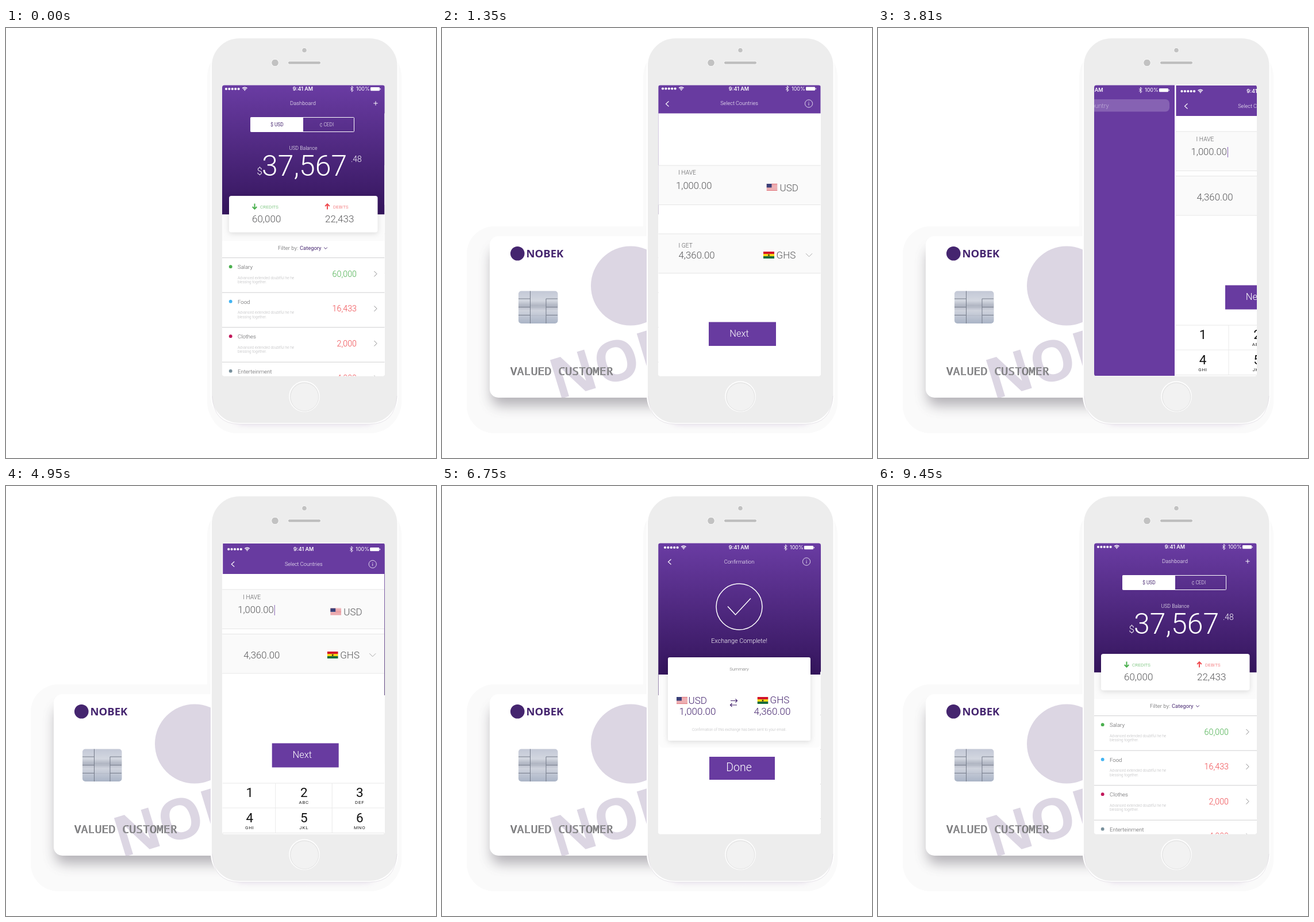
An HTML page for the animation above (9480 ms loop, 748 by 748 pixels).

```html
<!DOCTYPE html>
<html lang="en">
<head>
<meta charset="utf-8">
<title>Currency exchange app</title>
<style>
  html, body { margin: 0; width: 100%; height: 100%; overflow: hidden; background: #fff; }
  svg { display: block; }
  #stage { width: 100vw; height: 100vh; }
  text { font-family: Roboto, "Liberation Sans", sans-serif; font-weight: 300; white-space: pre; }
  .status text { font-family: Inter, sans-serif; font-weight: 400; }
  .panel { filter: drop-shadow(0 2px 5px rgba(0, 0, 0, .13)); }
</style>
</head>
<body>
<svg id="stage" viewBox="0 0 748 748">
  <defs>
    <linearGradient id="dusk" x2="0" y2="1">
      <stop stop-color="#6a3ca3"/><stop offset="1" stop-color="#34155c"/>
    </linearGradient>
    <linearGradient id="metal" x2="0" y2="1">
      <stop stop-color="#c3c8d6"/><stop offset=".3" stop-color="#d3d7e0"/>
      <stop offset=".45" stop-color="#b0b5c2"/><stop offset=".6" stop-color="#cfd3dd"/>
      <stop offset="1" stop-color="#aab4c6"/>
    </linearGradient>
    <filter id="blur" x="-30%" y="-30%" width="160%" height="160%"><feGaussianBlur stdDeviation="11"/></filter>
    <filter id="softBlur" x="-20%" y="-50%" width="140%" height="200%"><feGaussianBlur stdDeviation="5"/></filter>
    <clipPath id="display"><rect x="376" y="99.5" width="283" height="506" rx="4"/></clipPath>
    <clipPath id="cardShape"><rect x="83" y="362" width="445" height="281" rx="15"/></clipPath>
    <clipPath id="behindPhone"><rect width="640" height="748"/></clipPath>
  </defs>
  <g id="back"></g>
  <g clip-path="url(#behindPhone)"><g id="card"></g></g>
  <g id="phone"></g>
  <g clip-path="url(#display)"><g id="strip"></g></g>
</svg>
<script>
const PURPLE = '#683ba0', DEEP = '#45256f', GREY = '#58585a', PALE = '#b9b9bb';
const GREEN = '#4bb04f', RED = '#ef4a4f';
const LOOP = 9480, STEP = 30, STRIDE = 282;

// Drawing helpers
const rect = (x, y, w, h, fill, more = '') =>
  `<rect x="${x}" y="${y}" width="${w}" height="${h}" fill="${fill}" ${more}/>`;
const circle = (x, y, r, fill, more = '') =>
  `<circle cx="${x}" cy="${y}" r="${r}" fill="${fill}" ${more}/>`;
const line = (d, color, width = 1) =>
  `<path d="${d}" fill="none" stroke="${color}" stroke-width="${width}"/>`;
const shape = (d, fill) => `<path d="${d}" fill="${fill}"/>`;
const text = (x, y, size, fill, str, more = '') =>
  `<text x="${x}" y="${y}" font-size="${size}" fill="${fill}" ${more}>${str}</text>`;
const mid = (x, y, size, fill, str, more = '') =>
  text(x, y, size, fill, str, 'text-anchor="middle" ' + more);
const right = (x, y, size, fill, str) => text(x, y, size, fill, str, 'text-anchor="end"');
const shift = (x, y, content) => `<g transform="translate(${x} ${y})">${content}</g>`;
const each = (n, fn) => Array.from({ length: n }, (_, i) => fn(i)).join('');

// Flags on an 18 x 12 field
const rows = (...c) => c.map((f, i) => rect(0, i * 12 / c.length, 18, 12 / c.length + .05, f)).join('');
const columns = (...c) => c.map((f, i) => rect(i * 18 / c.length, 0, 18 / c.length + .05, 12, f)).join('');
const jack = rows('#1f3580') + line('M0 0L18 12M18 0L0 12', '#fff', 2.6) + line('M0 0L18 12M18 0L0 12', '#d4213d', 1)
  + line('M9 0V12M0 6H18', '#fff', 4) + line('M9 0V12M0 6H18', '#d4213d', 2.2);
const canton = `<g transform="scale(.5)">${jack}</g>`;
const star = (x, y, r, fill) => shape('M' + Array.from({ length: 10 }, (_, i) => {
  const a = i * Math.PI / 5, d = i % 2 ? r * .4 : r;
  return `${x + d * Math.sin(a)} ${y - d * Math.cos(a)}`;
}).join('L') + 'Z', fill);
const stars = (fill, ...points) => points.map(([x, y]) => star(x, y, 1, fill)).join('');

const flags = {
  AOA: rows('#d0142c', '#111') + circle(9, 6, 2, 'none', 'stroke="#f6c92c"') + circle(9.5, 6, .8, '#f6c92c'),
  AUD: rows('#17296f') + canton + star(4.5, 9.3, 1.5, '#fff') + stars('#fff', [13.5, 2], [11.5, 5.5], [15.5, 5], [13.5, 10]),
  BSD: rows('#1aa3b8', '#f8d63f', '#1aa3b8') + shape('M0 0L8 6L0 12Z', '#111'),
  BMD: rows('#d0142c') + canton + rect(11.5, 4, 4, 5, '#fff') + circle(13.5, 6.5, 1.2, '#d0142c'),
  BWP: rows('#75b2dd', '#75b2dd', '#fff', '#111', '#fff', '#75b2dd', '#75b2dd'),
  BRL: rows('#17963f') + shape('M9 1L17 6L9 11L1 6Z', '#f9d616') + circle(9, 6, 2.6, '#26357c'),
  GBP: jack,
  BIF: rows('#d0142c') + shape('M0 0L9 6L0 12ZM18 0L9 6L18 12Z', '#1f9a3a')
    + line('M0 0L18 12M18 0L0 12', '#fff', 2) + circle(9, 6, 3.2, '#fff') + stars('#d0142c', [9, 4.7], [7.7, 7], [10.3, 7]),
  CAD: columns('#e0202a', '#fff', '#fff', '#e0202a') + star(9, 6, 2.8, '#e0202a'),
  CNY: rows('#df2a1c') + star(4, 4, 2.3, '#f9dc2e') + stars('#f9dc2e', [8, 1.8], [9.3, 3.6], [9.3, 5.7], [8, 7.5]),
  COP: rows('#f8d21c', '#f8d21c', '#21409a', '#d0142c'),
  CDF: rows('#2a83d5') + line('M0 12L18 0', '#f7d618', 5) + line('M0 12L18 0', '#d8283b', 3) + star(3.5, 3, 2, '#f7d618'),
  EGP: rows('#d0142c', '#fff', '#111') + circle(9, 6, 1.4, '#c79a2b'),
  ETB: rows('#1f9a3a', '#f8d21c', '#d8232e') + circle(9, 6, 3.2, '#1b55b5') + star(9, 6, 2, '#f8d21c'),
  EUR: rows('#1d439c') + each(12, i => circle(9 + 3.8 * Math.sin(i * Math.PI / 6), 6 - 3.8 * Math.cos(i * Math.PI / 6), .55, '#f8d21c')),
  GMD: rect(0, 0, 18, 4, '#d0142c') + rect(0, 4, 18, 4, '#fff') + rect(0, 4.6, 18, 2.8, '#1c2f8a') + rect(0, 8, 18, 4, '#1f9a3a'),
  GHS: rows('#d3122a', '#f9d616', '#136b3c') + star(9, 6.1, 2.2, '#111'),
  GNF: columns('#d0142c', '#f8d21c', '#1f9a3a'),
  USD: rows(...Array.from({ length: 13 }, (_, i) => i % 2 ? '#fff' : '#d43a44')) + rect(0, 0, 8.5, 6.5, '#3a3f78'),
};
const flag = (code, x, y, w = 19, h = 12) =>
  `<svg x="${x}" y="${y}" width="${w}" height="${h}" viewBox="0 0 18 12" preserveAspectRatio="none">${flags[code]}</svg>`;

// Interface parts
const status = (left, time, rightX, y) => `<g class="status">
  ${each(5, i => circle(left + i * 5.4, y, 2.1, '#fff'))}
  ${shift(left + 32.3, y, line('M-4.2 -1.1Q0 -4.5 4.2 -1.1M-2.5 .8Q0 -1.2 2.5 .8', '#fff', 1.4) + circle(0, 2.2, 1, '#fff'))}
  ${mid(time, y + 3.4, 9, '#fff', '9:41 AM', 'style="font-weight:600"')}
  ${shift(rightX, y, line('M-10 -2.4L-4.8 2.4L-7.4 4.8V-4.8L-4.8 -2.4L-10 2.4', '#fff', .9))}
  ${text(rightX, y + 3.4, 9, '#fff', '100%')}
  ${rect(rightX + 25, y - 3, 16, 6.2, '#fff', 'rx="1.2"')}${rect(rightX + 41.6, y - 1, 1.2, 2.4, '#fff')}</g>`;
const backArrow = (x, y) => line(`M${x + 5} ${y - 4.5}L${x} ${y}L${x + 5} ${y + 4.5}`, '#fff', 1.1);
const info = (x, y) => circle(x, y, 6.6, 'none', 'stroke="#fff" stroke-width=".8"')
  + line(`M${x} ${y - 1}V${y + 3.2}M${x} ${y - 3.2}V${y - 2}`, '#fff', .8);
const down = (x, y, w, color) => line(`M${x - w} ${y - w / 2}L${x} ${y + w / 2}L${x + w} ${y - w / 2}`, color);
const button = (x, y, w, h, label, size) =>
  rect(x, y, w, h, PURPLE) + mid(x + w / 2 - 5.5, y + h / 2 + size * .27, size, '#fff', label);
const band = y => rect(376.5, y, 282.5, 68, '#fafafa') + line(`M376.5 ${y}H659M376.5 ${y + 68.5}H659`, '#e6e6e6');
const arrow = (x, y, dir, color) =>
  line(`M${x} ${y - 5 * dir}V${y + 4 * dir}M${x - 3.8} ${y + .5 * dir}L${x} ${y + 4.4 * dir}L${x + 3.8} ${y + .5 * dir}`, color, 2);

function dashboard(d) {
  const entries = [['Salary', GREEN], ['Food', '#42b4f2'], ['Clothes', '#c2185b'], ['Enterteinment', '#78909c']];
  const usd = d.currency === 'USD', split = usd ? 517 : 514.5, dy = usd ? 0 : -1.5, edge = d.panel[0];
  return rect(376, 99, 282.5, d.bottom - 99, 'url(#dusk)')
    + status(383, usd ? 516.5 : 515.5, usd ? 609 : 607, 106)
    + mid(usd ? 516.5 : 515.5, 134, 9.4, '#fff', 'Dashboard')
    + shift(usd ? 643 : 640.5, 131, line('M-3.7 0H3.7M0 -3.7V3.7', '#fff'))
    + rect(d.toggle, 155.5, 605.5 - d.toggle, 25, 'none', 'rx="1" stroke="#fff"')
    + rect(usd ? d.toggle : split, 155.5, usd ? split - d.toggle : 605.5 - split, 25, '#fff')
    + mid(471.5, 171, 8.3, usd ? DEEP : '#fff', '$ USD', usd ? 'style="font-weight:400"' : '')
    + mid(usd ? 558 : 555.5, 171, 8.3, usd ? '#fff' : DEEP, usd ? '¢ CEDI' : '¢ GHS', usd ? '' : 'style="font-weight:400"')
    + mid(517, 211.5, 8.7, '#fff', d.currency + ' Balance')
    + d.amount
    + rect(376, d.bottom, 283, 46, '#fbfbfb') + rect(376, 362 + dy, 283, 8, '#fbfbfb', 'rx="6"')
    + rect(edge, d.panel[1], d.panel[2], 63.5, '#fff', 'rx="4" class="panel"')
    + shift(0, dy / 2, arrow(432.5, 310.5, 1, GREEN) + text(442, 314, 8.1, GREEN, 'CREDITS')
      + arrow(usd ? 559 : 557.5, 310.5, -1, RED) + text(usd ? 569 : 567, 314, 8.1, RED, 'DEBITS')
      + text(428, 338, 17, GREY, d.credits) + text(usd ? 555 : 553.5, 338, 17, GREY, d.debits))
    + shift(usd ? 0 : -1, dy, text(473, 386, 9.6, GREY, 'Filter by:')
      + text(511, 386, 9.4, DEEP, 'Category', 'style="font-weight:400"') + down(556, 383, 2.8, DEEP))
    + entries.map(([name, color], i) => shift(0, dy + i * (usd ? 60.5 : 60.2),
        line('M376 399.7H659', '#cfcfd1') + circle(usd ? 390.7 : 391.7, 415.2, 2.9, color)
        + text(403, 419.3, 9.6, GREY, name)
        + text(403, 436.6, 6.5, PALE, 'Advanced extended doubtful he he') + text(403, 444, 6.5, PALE, 'blessing together.')
        + right(usd ? 610 : 608, 432.8, 14.3, i ? RED : GREEN, d.values[i])
        + shift(usd ? 0 : -2, 0, line('M640.5 423L645 427.7L640.5 432.4', '#8a8a8c')))).join('');
}
const dollars = dashboard({ currency: 'USD', bottom: 324.5, toggle: 425.5, panel: [388, 292, 258.5],
  amount: text(436.5, 255, 17, '#fff', '$') + text(445, 257, 50, '#fff', '37,567') + text(600, 232.5, 14, '#fff', '.48'),
  credits: '60,000', debits: '22,433', values: ['60,000', '16,433', '2,000', '4,000'] });
const cedis = dashboard({ currency: 'GHS', bottom: 323.5, toggle: 427, panel: [389, 291, 255.5],
  amount: text(414.5, 258, 16.5, '#fff', '¢') + text(425.5, 258, 49.5, '#fff', '163,794') + text(598, 231.5, 14, '#fff', '.21'),
  credits: '261,600', debits: '97,807', values: ['261,600', '71,647', '8,720', '17,440'] });

const countries = rect(376.5, 99, 282.5, 49.5, PURPLE) + status(384, 516.5, 608, 105.5)
  + backArrow(389.5, 132) + mid(517, 134, 9.2, '#fff', 'Select Countries') + info(638, 131.5)
  + band(239) + text(411, 255, 10.3, GREY, 'I HAVE') + text(407, 279.5, 16.6, GREY, '1,000.00')
  + flag('USD', 564.5, 271) + text(587.5, 283.5, 17, GREY, 'USD')
  + band(358) + text(411.5, 381.5, 10.3, GREY, 'I GET') + text(411.5, 401, 16.8, GREY, '4,360.00')
  + flag('GHS', 559, 389) + text(581.5, 401, 17, GREY, 'GHS') + down(638.5, 395, 5.5, '#aaa')
  + button(464, 511.5, 117, 41.5, 'Next', 16.5);

const currencies = ['AOA Angolan Kwanza', 'AUD Australian Dollar', 'BSD Bahamas Dollar', 'BMD Bermuda Dollar',
  'BWP Botwana Pula', 'BRL Brazillian Real', 'GBP British Pound', 'BIF Burundi Franc', 'CAD Canadian Dollar',
  'CNY Chinese Yuan', 'COP Colombian Peso', 'CDF Congo Franc', 'EGP Egyptian Pound', 'ETB Ethiopian Birr',
  'EUR Eurozone Euro', 'GMD Gambian Dalasi', 'GHS Ghanaian Cedi', 'GNF Guinean Franc'];
const search = rect(377, 99, 280, 506, PURPLE) + status(384, 515, 605, 108)
  + line('M384.5 130.5L394 140M394 130.5L384.5 140', '#fff', 1.8)
  + rect(402, 124, 246, 21.5, '#fff', 'rx="7" opacity=".2"')
  + circle(457.8, 135.3, 4, 'none', 'stroke="#fff"') + line('M460.8 138.3L464 141.5', '#fff', 1.2)
  + text(472, 138.7, 10.7, '#c3b1da', 'Search country')
  + currencies.map((entry, i) => {
      const y = 183 + i * 24.47, code = entry.slice(0, 3);
      return flag(code, 387, y - 5, 19, 13) + text(419, y + 3, 8.3, '#fff', code) + text(451, y + 3, 8.1, '#fff', entry.slice(4));
    }).join('');

const keys = ['1', '2ABC', '3DEF', '4GHI', '5JKL', '6MNO'];
const typing = rect(377.5, 100, 281.5, 53, PURPLE) + status(387.5, 518, 608.5, 110)
  + backArrow(392.5, 136) + mid(518, 139, 9.2, '#fff', 'Select Countries') + info(638, 136)
  + band(180) + text(412.5, 196.5, 10.3, GREY, 'I HAVE') + text(403.5, 221, 16.6, GREY, '1,000.00')
  + line('M467.5 207V225', PURPLE, .8) + flag('USD', 564.5, 212.5) + text(587.5, 225, 17, GREY, 'USD')
  + band(257.5) + text(413.5, 300, 16.8, GREY, '4,360.00')
  + flag('GHS', 559, 288) + text(581.5, 300, 17, GREY, 'GHS') + down(638, 294, 5.5, '#aaa')
  + button(463, 447.5, 116, 42, 'Next', 16.5)
  + line('M377 517H659M377 560H659M377 603.5H659M469 517V603.5M567.5 517V603.5', '#e9e9e9')
  + keys.map((key, i) => {
      const x = [424, 518.5, 615.5][i % 3], y = i < 3 ? 541 : 584.5;
      return mid(x, y, 22.5, '#111', key[0], 'style="font-weight:400"')
        + mid(x, y + 12, 8, '#222', key.slice(1), 'letter-spacing=".7" style="font-weight:400"');
    }).join('');

const summary = note => rect(377, 328, 282, 127, '#fcfcfc', 'rx="8"') + rect(393, 298, 248, 145, '#fff', 'rx="3" class="panel"')
  + mid(517, 321, 7.8, '#666', 'Summary')
  + flag('USD', 408, 367) + text(428.5, 379, 17, DEEP, 'USD') + text(412.5, 398, 17, DEEP, '1,000.00')
  + line('M502 373.5H513.5M510.5 370.5L513.5 373.5L510.5 376.5M513 381H501.5M504.5 378L501.5 381L504.5 384', DEEP, 1.2)
  + flag('GHS', 548.5, 367) + text(570.5, 378, 17, DEEP, 'GHS') + text(542.5, 398, 17, DEEP, '4,360.00')
  + mid(517, 426, 6.4, PALE, note);
const heading = bottom => rect(376.5, 99, 282.5, bottom - 99, 'url(#dusk)') + status(388, 516.5, 605, 107)
  + backArrow(393.5, 132) + mid(517, 134.5, 9.2, '#fff', 'Confirmation') + info(634, 131.5);

const review = heading(364) + mid(517, 200, 10.8, '#fff', 'Exchange Rate') + mid(517, 236, 24, '#fff', '1 USD = 4.36 GHS')
  + shift(0, 36, summary('')) + button(464, 525, 117, 42, 'Confirm', 16.5);
const complete = heading(328) + circle(517, 210, 40, 'none', 'stroke="#fff" stroke-width="1.5"')
  + line('M497 209.5L510.5 224L537 195.5', '#fff', 1.5) + mid(517, 273, 10.9, '#fff', 'Exchange Complete!')
  + summary('Confirmation of this exchange has been sent to your email.') + button(465, 471, 114, 40, 'Done', 19.5);

const byId = id => document.getElementById(id);
byId('strip').innerHTML = [dollars, countries, search, typing, review, complete, cedis, dollars].map((screen, i) => {
  const inset = screen === dollars || screen === cedis ? 0 : .5;
  return shift(i * STRIDE, 0, rect(376 + inset, 99, 283 - inset, 507, '#fff') + screen);
}).join('');

byId('back').innerHTML = rect(350, 30, 338, 675, '#fafafa', 'rx="55"');
byId('phone').innerHTML = rect(390, 640, 258, 50, '#d3c3de', 'rx="24" opacity=".6" filter="url(#softBlur)"')
  + rect(357, 17, 324.5, 671, '#ededed', 'rx="49" stroke="#fff" stroke-width="2"')
  + line('M359 640Q361 689 406 689H633Q677 689 680 640', '#e2dfe5', .8)
  + circle(519, 38.7, 4.3, '#c2c2c2', 'stroke="#fafafa"') + circle(468, 60.5, 6.3, '#c2c2c2', 'stroke="#fafafa"')
  + rect(490.5, 57.8, 57, 5.4, '#bdbdbd', 'rx="2.7" stroke="#fafafa"')
  + circle(519, 641, 26, '#f1f1f1', 'stroke="#fff" stroke-width="1.4"') + circle(519.3, 641.8, 24.6, '#f2f2f2', 'stroke="#dcdcdc" stroke-width=".8"')
  + rect(376, 99.5, 283, 506, '#fff', 'rx="4"');

const brand = 'NOBEK', embossed = 'style="font-family:Noto Sans Mono,monospace;font-weight:400"';
const wordmark = 'style="font-family:Open Sans,sans-serif;font-weight:700"';
byId('card').innerHTML = rect(43, 345, 500, 360, '#fafafa', 'rx="48"')
  + rect(86, 385, 440, 272, '#55505c', 'rx="15" opacity=".42" filter="url(#blur)"')
  + rect(83, 362, 445, 281, '#fff', 'rx="15"')
  + `<g clip-path="url(#cardShape)">${circle(328, 448.5, 69, '#dcd6e3')}
     <g transform="translate(200 647) rotate(-17)">${text(0, 0, 98, '#dcd6e3', brand, wordmark)}</g></g>`
  + circle(131.3, 392.3, 12.3, DEEP) + text(146.5, 399, 18.5, DEEP, brand, wordmark)
  + rect(133, 457.5, 68.5, 56.5, 'url(#metal)', 'rx="5"')
  + line('M153.5 457.5V514M181 514V471H201M133 471H153M133 485.5H153M133 499.5H153M181 485.5H201M181 499.5H201', '#6d7382', .9)
  + line('M154 486H180M154 500H180', '#b3b8c5')
  + text(118.9, 604.2, 19.9, '#444', 'VALUED CUSTOMER', embossed)
  + text(118.1, 603.5, 19.9, '#97979a', 'VALUED CUSTOMER', embossed);

// Motion
const ease = p => p < .5 ? 4 * p ** 3 : 1 - 4 * (1 - p) ** 3;
const progress = (t, start, length) => ease(Math.min(1, Math.max(0, (t - start) / length)));

function draw(now) {
  const t = Math.floor(now % LOOP / STEP) * STEP;
  let position = 0;
  for (let i = 0; i < 7; i++) position += progress(t, 870 + i * 1350, 480);
  byId('strip').setAttribute('transform', `translate(${-STRIDE * position} 0)`);
  byId('card').setAttribute('transform', `translate(${310 * (1 - progress(t, 30, 960))} 0)`);
}
const start = performance.now();
function tick() {
  draw(performance.now() - start);
  requestAnimationFrame(tick);
}
tick();
</script>
</body>
</html>
```
